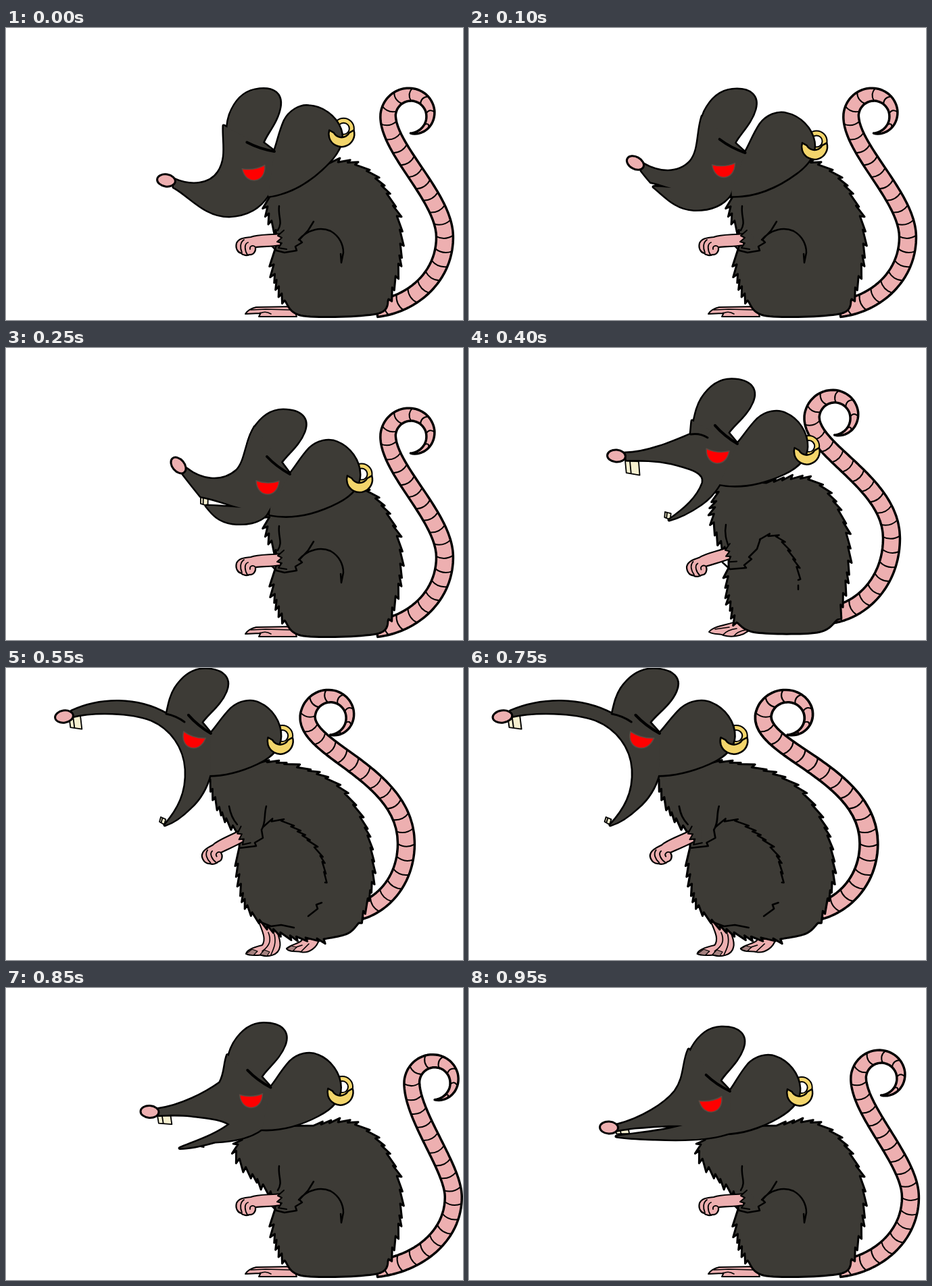
Recreate the animation shown at these times as an HTML page with a canvas. Size 676x433 px, loop 1050 ms.

```html
<!DOCTYPE html>
<html lang="en">
<head>
<meta charset="utf-8">
<title>Rat</title>
<style>
html, body { margin: 0; width: 100%; height: 100%; overflow: hidden; background: #fff; }
canvas { display: block; }
</style>
</head>
<body>
<canvas id="stage" width="676" height="433"></canvas>
<script>
const ctx = document.getElementById('stage').getContext('2d');
const FUR = '#3d3b36', PINK = '#edafb0', GOLD = '#f3d56b', TOOTH = '#f6f0d0';
const LOOP = 1050;

// Blend two values of the same structure, number by number.
function mix(a, b, t) {
  const num = /-?\d+(\.\d+)?/g;
  const other = JSON.stringify(b).match(num);
  let i = 0;
  return JSON.parse(JSON.stringify(a).replace(num, n => (+n + (other[i++] - n) * t).toFixed(1)));
}

let seed = 1;
const random = () => (seed = seed * 16807 % 2147483647) / 2147483647;
const vary = n => n * (0.7 + 0.6 * random());

// Catmull-Rom curve through a flat list x, y, x, y ...
function spline(flat) {
  const p = [], out = [];
  for (let i = 0; i < flat.length; i += 2) p.push([flat[i], flat[i + 1]]);
  const last = p.length - 1;
  for (let i = 0; i < last; i++) {
    const a = p[Math.max(i - 1, 0)], b = p[i], c = p[i + 1], d = p[Math.min(i + 2, last)];
    for (let t = 0; t < 1; t += 0.0625) {
      out.push([0, 1].map(j => b[j] + t / 2 * (c[j] - a[j]
        + t * (2 * a[j] - 5 * b[j] + 4 * c[j] - d[j] + t * (3 * (b[j] - c[j]) + d[j] - a[j])))));
    }
  }
  out.push(p[last]);
  return out;
}

function bezier(...p) {
  return Array.from({ length: 24 }, (_, i) => {
    const t = i / 24, s = 1 - t;
    return [0, 1].map(j => s * s * s * p[0][j] + 3 * s * s * t * p[1][j] + 3 * s * t * t * p[2][j] + t * t * t * p[3][j]);
  });
}

// Points along a curve at a given spacing, with unit tangents.
function walk(pts, spacing) {
  const out = [];
  let dist = 0, next = 0;
  for (let i = 1; i < pts.length; i++) {
    const [x, y] = pts[i - 1], dx = pts[i][0] - x, dy = pts[i][1] - y;
    const len = Math.hypot(dx, dy) || 1e-6;
    while (next <= dist + len) {
      const k = (next - dist) / len;
      out.push({ x: x + dx * k, y: y + dy * k, tx: dx / len, ty: dy / len });
      next += spacing();
    }
    dist += len;
  }
  return out;
}

// Saw-toothed edge; lean 1 points the hairs forward, -1 backward.
function fur(flat, gap, size, lean) {
  const pts = walk(spline(flat), () => vary(gap)), out = [];
  for (let i = 0; i < pts.length - 1; i++) {
    const p = pts[i], q = lean > 0 ? pts[i + 1] : p, s = vary(size);
    out.push([p.x, p.y], [q.x + q.ty * s + q.tx * lean * 3, q.y - q.tx * s + q.ty * lean * 3]);
  }
  out.push(flat.slice(-2));
  return out;
}

function poly(pts, closed) {
  const path = new Path2D();
  pts.forEach(([x, y]) => path.lineTo(x, y));
  if (closed) path.closePath();
  return path;
}

function paint(path, fill, width, line = '#000') {
  if (typeof path === 'string') path = new Path2D(path);
  if (fill) { ctx.fillStyle = fill; ctx.fill(path); }
  if (width) { ctx.lineWidth = width; ctx.strokeStyle = line; ctx.stroke(path); }
}

function at([x, y, deg = 0], draw) {
  ctx.save();
  ctx.translate(x, y);
  ctx.rotate(deg * Math.PI / 180);
  draw();
  ctx.restore();
}

const sit = {
  back: [455, 204, 508, 200, 551, 228, 580, 285, 581, 345, 566, 402],
  floor: [566, 402, 548, 424, 440, 427, 412, 404],
  belly: [412, 404, 397, 362, 398, 328],
  chest: [403, 308, 387, 265, 400, 228],
  hair: 6, arm: [355, 325, 0],
  lines: 'M404 264C402 280 410 288 402 300M392 322L400 330 412 333 430 330 428 324 438 318 434 314 447 300 455 287'
    + 'M433 314C447 298 466 295 480 301C494 309 499 322 499 333L496 348 495 335',
  feet: 'M425 413L370 414Q358 417 354 424L375 423Q378 421 374 428L430 428Z',
  toes: 'M376 423Q384 419 392 424M362 418L384 417 420 418'
};
const reach = { ...sit, chest: [398, 308, 350, 260, 343, 232, 380, 205] };
const crouch = {
  back: [440, 200, 506, 196, 547, 242, 561, 310, 545, 403],
  floor: [545, 403, 515, 422, 425, 422, 396, 407],
  belly: [396, 407, 384, 362, 384, 326],
  chest: [384, 305, 362, 258, 374, 195],
  hair: 6, arm: [337, 327, -13],
  thigh: [430, 284, 455, 280, 482, 318, 487, 344],
  lines: 'M380 262C377 278 382 288 386 300M375 318L386 328 410 326 407 322 418 313 414 310 426 298 431 283M487 352L487 358',
  feet: 'M398 404C386 411 362 411 355 421C362 426 372 423 376 426C390 430 412 427 420 411Z',
  toes: 'M364 417L385 414M376 425Q382 418 396 416M392 427Q397 420 410 418'
};
const stand = {
  back: [350, 145, 404, 141, 485, 171, 530, 235, 542, 310, 522, 378],
  floor: [522, 378, 505, 394, 470, 402],
  belly: [470, 402, 408, 393, 360, 357, 344, 298, 345, 266],
  chest: [346, 244, 319, 213, 302, 165, 310, 145],
  hair: 5, arm: [305, 279, -22],
  thigh: [380, 236, 408, 227, 461, 272, 472, 318],
  lines: 'M385 205C381 220 385 228 378 240L380 252 368 259 370 264 345 267M330 205C332 217 335 224 342 232'
    + 'M467 348L459 351 461 357 447 368M372 375L392 383 407 381 426 385',
  feet: 'M373 374C380 392 385 402 379 411C366 414 356 418 355 424C362 428 375 425 378 426C388 429 403 426 405 414C408 404 400 394 400 382Z'
    + 'M438 402C438 408 420 410 415 416C418 422 431 419 436 421C448 424 461 414 463 402Z',
  toes: 'M388 392C393 404 390 412 379 420M397 395C400 408 396 416 392 425M420 417L438 411M437 420L448 409',
  claws: 'M355 424L364 417 372 420 366 426ZM376 425L382 418 390 421 386 427ZM415 417L422 412 430 414 424 420Z'
};

// root, outermost point of the bend, centre of the curl
const tails = {
  rest: [548, 416, 649, 310, 599, 130],
  out: [548, 416, 653, 310, 610, 133],
  low: [534, 396, 625, 282, 541, 103],
  high: [512, 363, 592, 260, 480, 73]
};

// Skull and ear hang on the notch between the ears: [x, y, tilt].
const EAR = 'M0 0L-14-16C-6-29 13-42 21-63C28-81 18-95-10-95C-30-95-44-82-54-66C-62-52-63-40-66-26L-30 20Z';
const SKULL = 'M0 0C8-9 16-24 29-38C40-49 58-53 70-47C88-40 103-20 103 1C103 18 90 32 70 42C35 60 0 66-30 60L-25 15Z';

// teeth: x, y, width, height, angle
const faces = {
  down: {
    notch: [397, 183, -19], eye: [366, 206, -9], nose: [237, 226, 8],
    snout: 'M248 224C275 236 302 232 314 214C328 193 321 170 322 145L397 183L388 247'
      + 'C375 268 355 278 330 279C295 279 275 252 250 237C250 237 250 237 250 237C250 237 250 237 250 237C249 237 248 236 248 236Z',
    teeth: [[262, 237, 1, 1, 0], [264, 237, 1, 1, 0]]
  },
  sneer: {
    notch: [420, 187, 0], eye: [387, 197, 1], nose: [255, 174, 50],
    snout: 'M267 179C287 195 318 202 341 182C355 168 353 143 368 117L420 187L385 247'
      + 'C375 259 355 262 335 260C315 257 306 247 296 234C310 234 330 236 348 237C325 231 310 224 288 220C280 210 272 200 262 187Z',
    teeth: [[288, 219, 11, 13, 10], [312, 242, 1, 1, 0]]
  },
  level: {
    notch: [386, 153, -3], eye: [357, 164, -11], nose: [207, 207, 3],
    snout: 'M219 203C255 194 290 172 305 153C320 132 316 110 325 91L386 153L388 214'
      + 'C370 221 340 227 275 224C255 223 235 223 218 220C245 216 285 213 316 204C285 203 265 206 245 207C235 208 225 210 219 211Z',
    teeth: [[217, 211, 19, 6, -3], [285, 218, 1, 1, 0]]
  },
  gape: {
    notch: [397, 142, 2], eye: [368, 151, 6], nose: [218, 160, 5],
    snout: 'M231 156C262 156 300 140 328 128C329 121 329 115 330 108L397 142L370 203'
      + 'C362 216 352 226 343 232C327 243 312 251 296 255C320 238 338 222 346 200C350 183 325 178 300 171C275 166 255 166 233 166Z',
    teeth: [[231, 167, 20, 20, 4], [290, 243, 9, 9, 15]],
    brow: 'M328 128Q342 126 353 133'
  },
  roar: {
    notch: [303, 97, 2], eye: [279, 99, 17], nose: [86, 72, -8],
    snout: 'M97 64C140 44 195 44 237 68L303 97L302 157'
      + 'C296 180 285 196 273 207C262 218 250 228 235 233C255 210 268 185 266 150C264 118 245 90 215 77C185 65 130 64 97 72Z',
    teeth: [[93, 70, 17, 20, 2], [229, 221, 8, 8, 25]],
    brow: 'M237 68Q252 71 264 80'
  }
};

// start time, body, tail, face, sideways stretch
const steps = [
  [0, sit, tails.rest, faces.down],
  [100, sit, tails.rest, mix(faces.down, faces.sneer, 0.5)],
  [250, sit, tails.rest, faces.sneer],
  [400, crouch, tails.low, faces.gape],
  [550, stand, tails.high, faces.roar],
  [750, stand, tails.high, faces.roar, 1.071],
  [850, reach, mix(tails.rest, tails.out, 3.2), mix(faces.level, faces.gape, 0.5)],
  [950, reach, tails.out, faces.level]
];

function drawTail([x, y, mx, my, cx, cy]) {
  const r = 34, start = cx - r;
  const curl = Array.from({ length: 41 }, (_, i) => {
    const a = Math.PI * (1 + 1.53 * i / 40), d = r - 8 * i / 40;
    return [cx + d * Math.cos(a), cy + d * Math.sin(a)];
  });
  const pts = walk([
    ...bezier([x, y], [x + (mx - x) * 0.52, y - 6], [mx, my + (y - my) * 0.56], [mx, my]),
    ...bezier([mx, my], [mx, my - (mx - start) * 0.7], [start, cy + 50], [start, cy]),
    ...curl
  ], () => 3);
  const left = [], right = [], rings = new Path2D();
  pts.forEach((p, i) => {
    const w = 12.5 * (1 - (i / (pts.length - 1)) ** 7);
    const l = [p.x + p.ty * w, p.y - p.tx * w], e = [p.x - p.ty * w, p.y + p.tx * w];
    left.push(l);
    right.unshift(e);
    if (i % 7 === 5) {
      rings.moveTo(...l);
      rings.quadraticCurveTo(p.x - p.tx * 7, p.y - p.ty * 7, ...e);
    }
  });
  paint(poly([...left, ...right], true), PINK, 3.5);
  paint(rings, null, 2);
}

function drawBody(b) {
  seed = 77;
  paint(b.feet, PINK, 2);
  paint(b.toes, null, 1.6);
  if (b.claws) paint(b.claws, '#a5817f', 1.2);
  const edge = [
    ...fur(b.back, 16, b.hair * 0.8, 1), ...spline(b.floor),
    ...fur(b.belly, 13, b.hair, -1), ...fur(b.chest, 13, b.hair, -1)
  ];
  paint(poly(edge, true), FUR, 3);
  paint(b.lines, null, 2.5);
  if (b.thigh) paint(poly(fur(b.thigh, 13, 3.5, 1)), null, 2.5);
  at(b.arm, () => {
    paint('M53-20C30-18 17-19 7-15C-3-14-11-13-14-6C-16 2-12 8-7 9C-5 12 2 13 5 11C11 12 15 6 14 0C25-1 40-1 51-3Z', PINK, 2.2);
    paint('M-3-11C-9-7-9 1-6 8M3-7C-3-5-2 5 2 11M14 0C11-4 5-2 6 3', null, 1.8);
    paint('M56-25L47-17 53-14 46-8 53-6 48 1 60 3 66-15Z', FUR);
    paint('M56-25L47-17 53-14 46-8 53-6 48 1 60 3', null, 2);
  });
}

function arc(x, y, r, from = 0, to = 7) {
  const path = new Path2D();
  path.arc(x, y, r, from, to);
  return path;
}

function drawFace(f) {
  const [x, y, tilt] = f.notch;
  const place = (shape, deg) => {
    const path = new Path2D();
    path.addPath(new Path2D(shape), new DOMMatrix().translate(x, y).rotate(deg));
    return path;
  };
  const lobe = new DOMMatrix().translate(x, y).rotate(tilt).transformPoint({ x: 103, y: 6 });
  const ring = [lobe.x, lobe.y];

  at(ring, () => {
    const hoop = arc(3, -6, 12);
    paint(hoop, null, 9);
    paint(hoop, null, 5, GOLD);
  });
  f.teeth.forEach(([tx, ty, w, h, deg]) => at([tx, ty, deg], () =>
    paint(`M0 0H${w}L${w + h * 0.15} ${h}L${h * 0.15} ${h * 0.9}ZM${w * 0.35} 0l${h * 0.15} ${h * 0.9}`, TOOTH, 1.8)));

  // Outline every part first, then fill, so that the parts merge.
  const parts = [place(EAR, tilt * 0.6), place(SKULL, tilt), new Path2D(f.snout)];
  parts.forEach(p => paint(p, null, 5));
  parts.forEach(p => paint(p, FUR));
  paint(place('M-34-26Q-20-11 0 0', tilt), null, 4);
  if (f.brow) paint(f.brow, null, 3);

  at(f.nose, () => {
    const nose = new Path2D();
    nose.ellipse(0, 0, 13.5, 9, 0, 0, 7);
    paint(nose, PINK, 3);
  });
  at(f.eye, () => paint('M-17 0Q0 6 17 0C16 14 8 20 0 20C-8 20-16 14-17 0Z', '#f00', 1.5, '#5c4a42'));
  at(ring, () => {
    const crescent = arc(0, 2, 19, -0.3, Math.PI + 0.3);
    crescent.arc(0, -6, 13, Math.PI - 0.5, 0.5, true);
    crescent.closePath();
    paint(crescent, GOLD, 2.5);
  });
}

let shown;
function frame(now) {
  const t = now % LOOP;
  const step = steps.findLast(s => s[0] <= t);
  if (step !== shown) {
    shown = step;
    const [, body, tail, face, stretch = 1] = step;
    ctx.setTransform(1, 0, 0, 1, 0, 0);
    ctx.fillStyle = '#fff';
    ctx.fillRect(0, 0, 676, 433);
    ctx.lineJoin = ctx.lineCap = 'round';
    ctx.setTransform(stretch, 0, 0, 1, 600 * (1 - stretch), 0);
    drawTail(tail);
    drawBody(body);
    drawFace(face);
  }
  requestAnimationFrame(frame);
}
frame(0);
</script>
</body>
</html>
```
